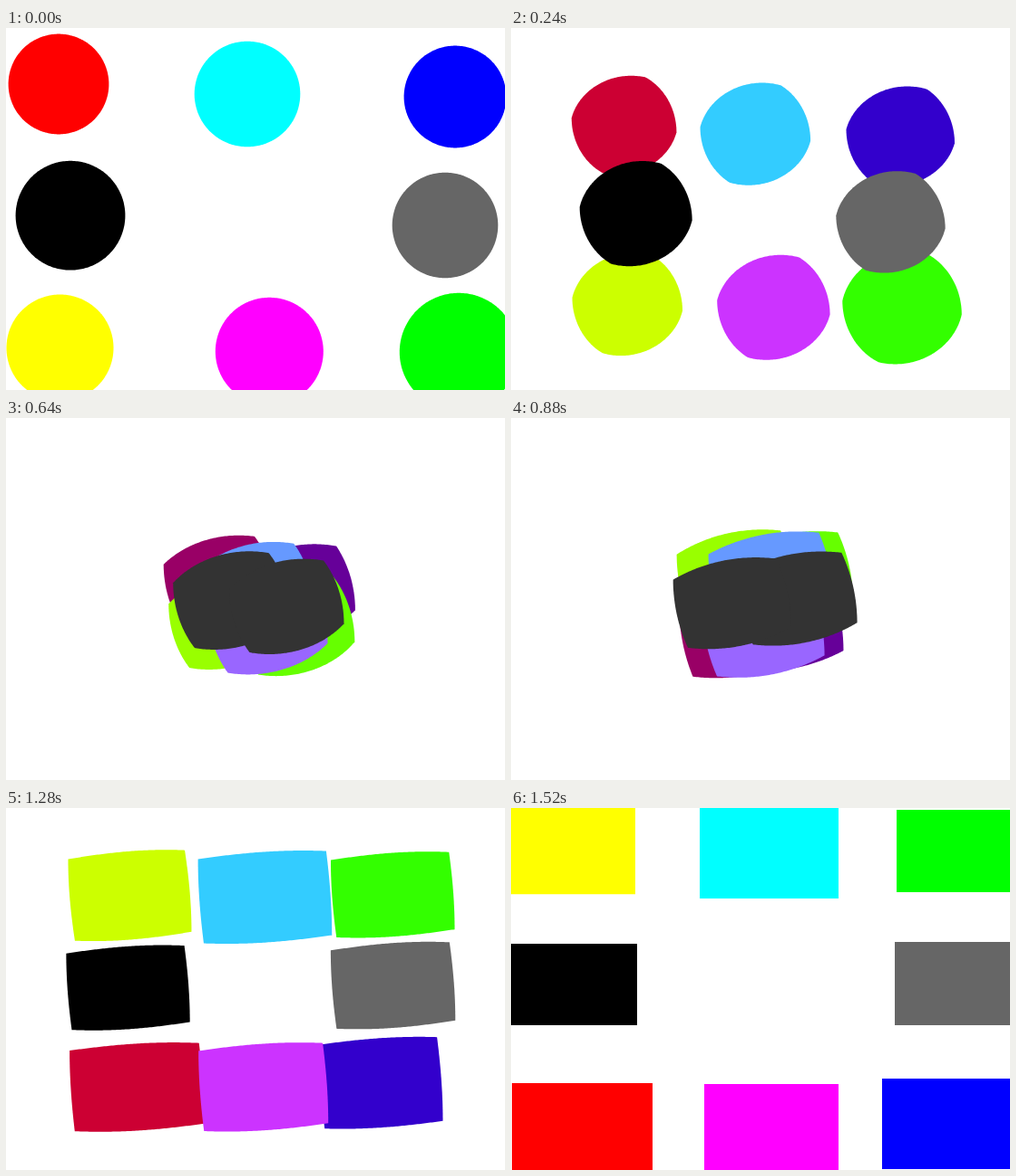
These frames come from a looping animation (550x400 px, 1.6 s). An HTML page with a canvas:

```html
<!DOCTYPE html>
<html lang="en">
<head>
<meta charset="utf-8">
<title>Circles to rectangles</title>
<style>
  html, body { margin: 0; height: 100%; overflow: hidden; background: #fff; }
  canvas { display: block; }
</style>
</head>
<body>
<canvas id="stage" width="550" height="400"></canvas>
<script>
const ctx = document.getElementById('stage').getContext('2d');
const STEP = 80, STEPS = 20, POINTS = 240;

const RED = [255, 0, 0], BLUE = [0, 0, 255], YELLOW = [255, 255, 0], GREEN = [0, 255, 0];
const CYAN = [0, 255, 255], MAGENTA = [255, 0, 255], BLACK = [0, 0, 0], GREY = [102, 102, 102];

// circle: centre x, y, radius; rect: left, top, right, bottom. Back to front.
const shapes = [
  { circle: [58, 62, 55.4], rect: [409, 299, 550.5, 399], from: RED, to: BLUE },
  { circle: [495, 76, 56.4], rect: [1, 304, 156, 400], from: BLUE, to: RED },
  { circle: [59.5, 353.5, 59], rect: [425, 2, 565, 93], from: YELLOW, to: GREEN },
  { circle: [499, 358, 65.2], rect: [0, 0, 137, 95.3], from: GREEN, to: YELLOW },
  { circle: [266, 73, 58.3], rect: [213, 305, 361, 400], from: CYAN, to: MAGENTA },
  { circle: [290.3, 357.3, 59.5], rect: [208, 0, 361, 100], from: MAGENTA, to: CYAN },
  { circle: [71, 207.2, 60.4], rect: [423, 148, 563.5, 240], from: BLACK, to: GREY },
  { circle: [484, 218, 58.3], rect: [-1, 150, 139, 240], from: GREY, to: BLACK }
];

const mix = (a, b, f) => a + (b - a) * f;

// Coarse colour steps of the web palette
const snap = v => Math.round((v & 240) / 51) * 51;

// Point at distance d along the outline, clockwise from the top left corner
function rectPoint([left, top, right, bottom], d) {
  const w = right - left, h = bottom - top;
  if (d < w) return [left + d, top];
  if (d < w + h) return [right, top + d - w];
  if (d < 2 * w + h) return [right - (d - w - h), bottom];
  return [left, bottom - (d - 2 * w - h)];
}

function drawShape({ circle: [cx, cy, r], rect, from, to }, f) {
  const w = rect[2] - rect[0], h = rect[3] - rect[1], length = 2 * (w + h);
  const distances = [w, w + h, 2 * w + h]; // keep the corners sharp
  for (let i = 0; i < POINTS; i++) distances.push(i / POINTS * length);
  distances.sort((a, b) => a - b);

  ctx.beginPath();
  for (const d of distances) {
    const angle = Math.PI + d / length * 2 * Math.PI;
    const [x, y] = rectPoint(rect, d);
    ctx.lineTo(mix(cx + r * Math.cos(angle), x, f), mix(cy + r * Math.sin(angle), y, f));
  }
  ctx.closePath();
  ctx.fillStyle = `rgb(${from.map((v, i) => snap(mix(v, to[i], f)))})`;
  ctx.fill();
}

function draw() {
  const f = Math.floor(performance.now() / STEP) % STEPS / (STEPS - 1);
  ctx.fillStyle = '#fff';
  ctx.fillRect(0, 0, 550, 400);
  for (const shape of shapes) drawShape(shape, f);
  requestAnimationFrame(draw);
}
draw();
</script>
</body>
</html>
```
